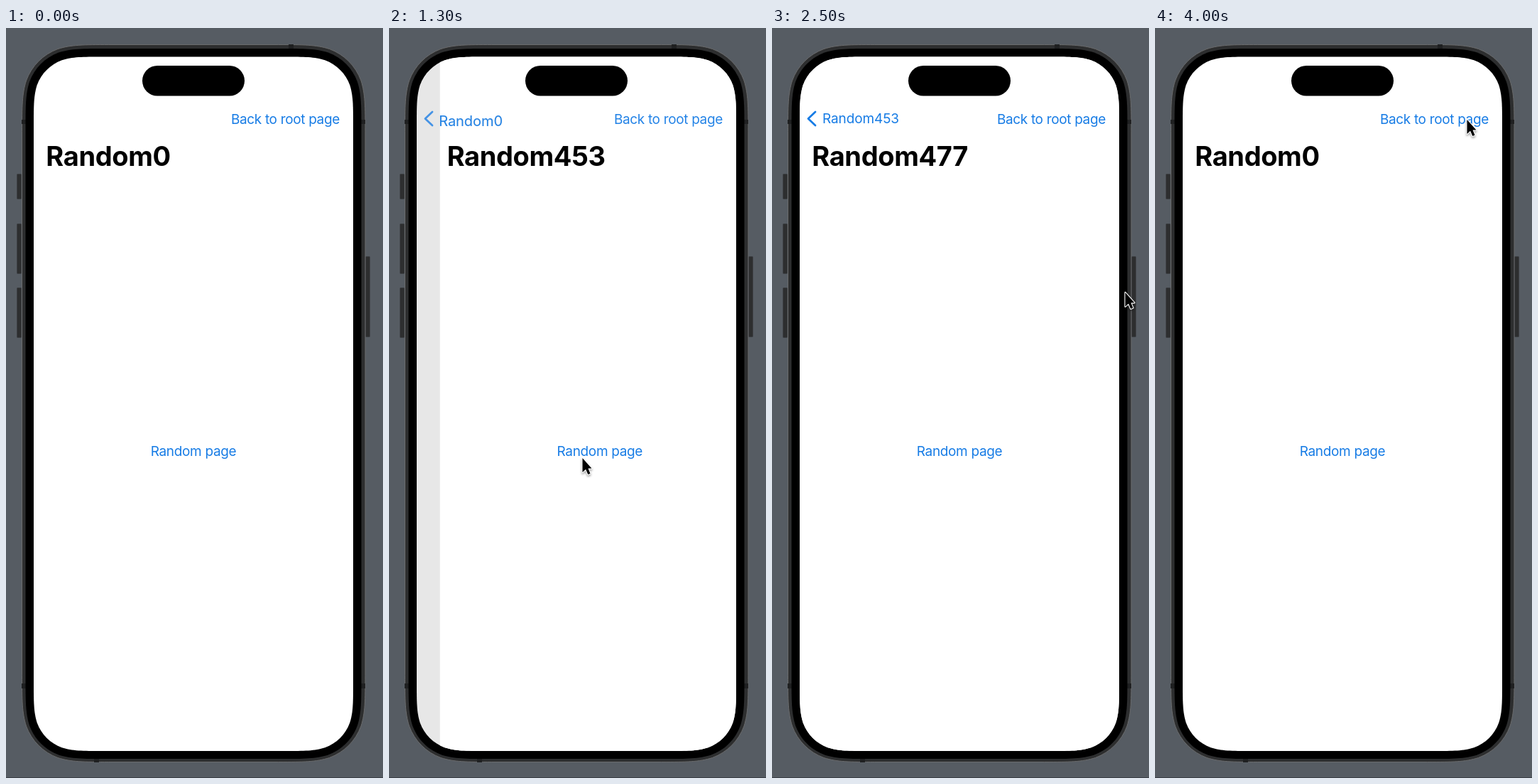
An HTML page for the animation above (4.43 s loop, 531 px wide and 1055 px high).

```html
<!DOCTYPE html>
<html lang="en">
<head>
<meta charset="utf-8">
<title>Navigation demo</title>
<style>
  html, body { margin: 0; width: 100%; height: 100%; overflow: hidden; background: #565c63; }
  svg { display: block; width: 100vw; height: 100vh; }
  text { font-family: Inter, Roboto, sans-serif; white-space: pre; }
  .link { font-size: 19px; letter-spacing: -.018em; fill: #177ce5; }
  .label { letter-spacing: -.006em; }
  .title { font-size: 38px; font-weight: 700; letter-spacing: -.01em; fill: #000; }
  .mid { text-anchor: middle; }
  .end { text-anchor: end; }
  .button { fill: #2d2e2f; stroke: #3c3f42; }
  .band { fill: #1f2021; }
  #cursor { filter: drop-shadow(0 2px 1.5px rgba(0, 0, 0, .35)); }
</style>
</head>
<body>
<svg viewBox="0 0 531 1055">
  <defs><clipPath id="clip"><path id="screen"/></clipPath></defs>

  <rect width="531" height="1055" fill="#565c63"/>
  <rect y="1054" width="531" height="1" fill="#3a3f45"/>
  <g class="button">
    <rect x="15.5" y="205.5" width="6" height="35" rx="1"/>
    <rect x="15.5" y="275.5" width="6" height="70" rx="1"/>
    <rect x="15.5" y="365.5" width="6" height="70" rx="1"/>
    <rect x="506.5" y="321.5" width="6" height="113" rx="1"/>
  </g>
  <path id="body" fill="#2d2e2f" stroke="#6a6b6c"/>
  <g class="band">
    <rect x="22" y="129" width="6" height="6"/>
    <rect x="500" y="129" width="6" height="6"/>
    <rect x="22" y="922" width="6" height="7"/>
    <rect x="500" y="922" width="6" height="7"/>
    <rect x="398" y="23" width="7" height="6"/>
    <rect x="124" y="1027" width="7" height="6"/>
  </g>
  <path id="bezel"/>

  <g clip-path="url(#clip)">
    <g id="under">
      <rect x="39" y="40" width="600" height="978" fill="#fff"/>
      <text id="underLink" class="link mid" x="264" y="602">Random page</text>
    </g>
    <rect id="dim" x="39" y="40" width="450" height="978"/>
    <g id="over">
      <rect x="39" y="40" width="450" height="978" fill="#fff"/>
      <text id="overLink" class="link mid" x="264" y="602">Random page</text>
    </g>
    <text id="lowTitle" class="title" x="-1.7"></text>
    <text id="highLabel" class="link label" x="-1"></text>
    <text id="lowLabel" class="link label" x="71" y="134.3"></text>
    <text id="highTitle" class="title" x="56.3" y="194"></text>
    <path id="chevron" d="M61 118 51 127.5 61 137" fill="none" stroke="#177ce5"
      stroke-width="2.8" stroke-linecap="round" stroke-linejoin="round"/>
    <text id="back" class="link end" x="470" y="134.5">Back to root page</text>
  </g>
  <rect x="192" y="53" width="144" height="42.5" rx="21.2"/>

  <circle id="ring" r="34.7" fill="none" stroke="#000" stroke-width="2.3"/>
  <g id="cursor">
    <path d="M1.5 2v20l4.6-4.3 3.2 7.4 3.2-1.4-3-7.1h5z" stroke="#fff" stroke-width="2.2"
      stroke-linejoin="round" paint-order="stroke"/>
  </g>
</svg>
<script>
const $ = id => document.getElementById(id);
const LOOP = 4430, WIDTH = 450;
const names = ['Random0', 'Random453', 'Random477'];
const moves = [
  { at: 1062, low: 0, high: 1, lowLabel: '', highLabel: names[0] },
  { at: 1802, low: 1, high: 2, lowLabel: names[0], highLabel: names[1] },
  { at: 3102, low: 0, high: 2, lowLabel: '', highLabel: names[1], pop: true }
];
const pagePress = [1000, 1700, Infinity], backPress = 3000;
const clicks = [900, 1600, 2900];
// time, x, y of the pointer tip
const path = [
  [100, 72, 656], [200, 130, 650], [300, 195, 636], [400, 232, 622], [500, 245, 616],
  [600, 245, 616], [800, 271, 603], [2200, 271, 603], [2300, 380, 592], [2400, 486, 555],
  [2500, 496, 370], [2600, 490, 160], [2700, 470, 70], [2800, 445, 115], [2900, 438, 127],
  [4430, 438, 127]
];

// Rounded box with continuous corners; the curve is given for radius 1
const corner = [
  [0, 1.529], [0, 1.088], [0, .868], [.075, .631], [.169, .373],
  [.373, .169], [.631, .075], [.868, 0], [1.088, 0], [1.529, 0]
];
function squircle(x0, y0, x1, y1, r) {
  const bend = (x, y, sx, sy) => {
    const ordered = sx === sy ? corner : [...corner].reverse();
    const pts = ordered.map(([u, v]) => `${x + sx * u * r} ${y + sy * v * r}`);
    return `L${pts[0]}C${pts.slice(1).join(' ')}`;
  };
  const d = bend(x0, y0, 1, 1) + bend(x1, y0, -1, 1) + bend(x1, y1, -1, -1) + bend(x0, y1, 1, -1);
  return `M${d.slice(1)}Z`;
}
$('body').setAttribute('d', squircle(22.5, 23.5, 506, 1032.5, 80));
$('bezel').setAttribute('d', squircle(27.5, 29, 500.5, 1028, 74));
$('screen').setAttribute('d', squircle(39, 40.5, 489, 1017, 63));

// Remaining distance of a critically damped spring
const spring = (ms, w) => ms <= 0 ? 1 : (1 + w * ms / 1000) * Math.exp(-w * ms / 1000);
const pressed = (t, at) => t < at ? 1 : Math.min(1, .2 + .8 * (t - at) / 360);
const place = (id, value) => $(id).setAttribute('transform', value);
const fade = (id, value) => $(id).setAttribute('opacity', value);

function pointer(t) {
  const i = Math.max(1, path.findIndex(p => p[0] >= t));
  const [t0, x0, y0] = path[i - 1], [t1, x1, y1] = path[i];
  const f = (t - t0) / (t1 - t0);
  return [x0 + (x1 - x0) * f, y0 + (y1 - y0) * f];
}

function render(t) {
  const m = moves.filter(v => v.at <= t).pop() || moves[0];
  const page = spring(t - m.at, 18), nav = spring(t - m.at - 39, 23.1);
  const q = m.pop ? 1 - page : page, n = m.pop ? 1 - nav : nav;

  place('under', `translate(${-.3 * WIDTH * (1 - q)})`);
  place('over', `translate(${WIDTH * q})`);
  fade('dim', .1 * (1 - q));
  fade('underLink', pressed(t, pagePress[m.low]));
  fade('overLink', pressed(t, pagePress[m.high]));

  // The large title shrinks into the back label
  $('lowTitle').textContent = names[m.low];
  $('highTitle').textContent = names[m.high];
  $('lowLabel').textContent = m.lowLabel;
  $('highLabel').textContent = m.highLabel;
  const at = `translate(${72 - 14 * n} ${134.3 + 59.7 * n})`, s = 1 + 1.06 * n;
  place('lowTitle', `${at} scale(${s / 2.06})`);
  place('highLabel', `${at} scale(${s})`);
  place('highTitle', `translate(${WIDTH * n})`);
  place('lowLabel', `translate(${-40 * (1 - n)})`);
  fade('lowTitle', n);
  fade('lowLabel', n);
  fade('highLabel', 1 - n);
  fade('chevron', m.lowLabel ? 1 : Math.max(0, 1 - 4 * n));

  // Leaving and arriving copies of the bar button overlap
  const press = pressed(t, backPress);
  const leaving = nav * press, arriving = (1 - nav) * (m.pop ? 1 : press);
  fade('back', 1 - (1 - leaving) * (1 - arriving));

  const [x, y] = pointer(t);
  place('cursor', `translate(${x} ${y})`);
  place('ring', `translate(${x} ${y})`);
  fade('cursor', t < 100 ? 0 : 1);
  fade('ring', clicks.includes(t) ? 1 : 0);
}

// The picture advances ten times a second
const start = performance.now();
function tick() {
  const t = (performance.now() - start) % LOOP;
  render(Math.min(4000, Math.floor(t / 100) * 100));
  requestAnimationFrame(tick);
}
render(0);
requestAnimationFrame(tick);
</script>
</body>
</html>
```
